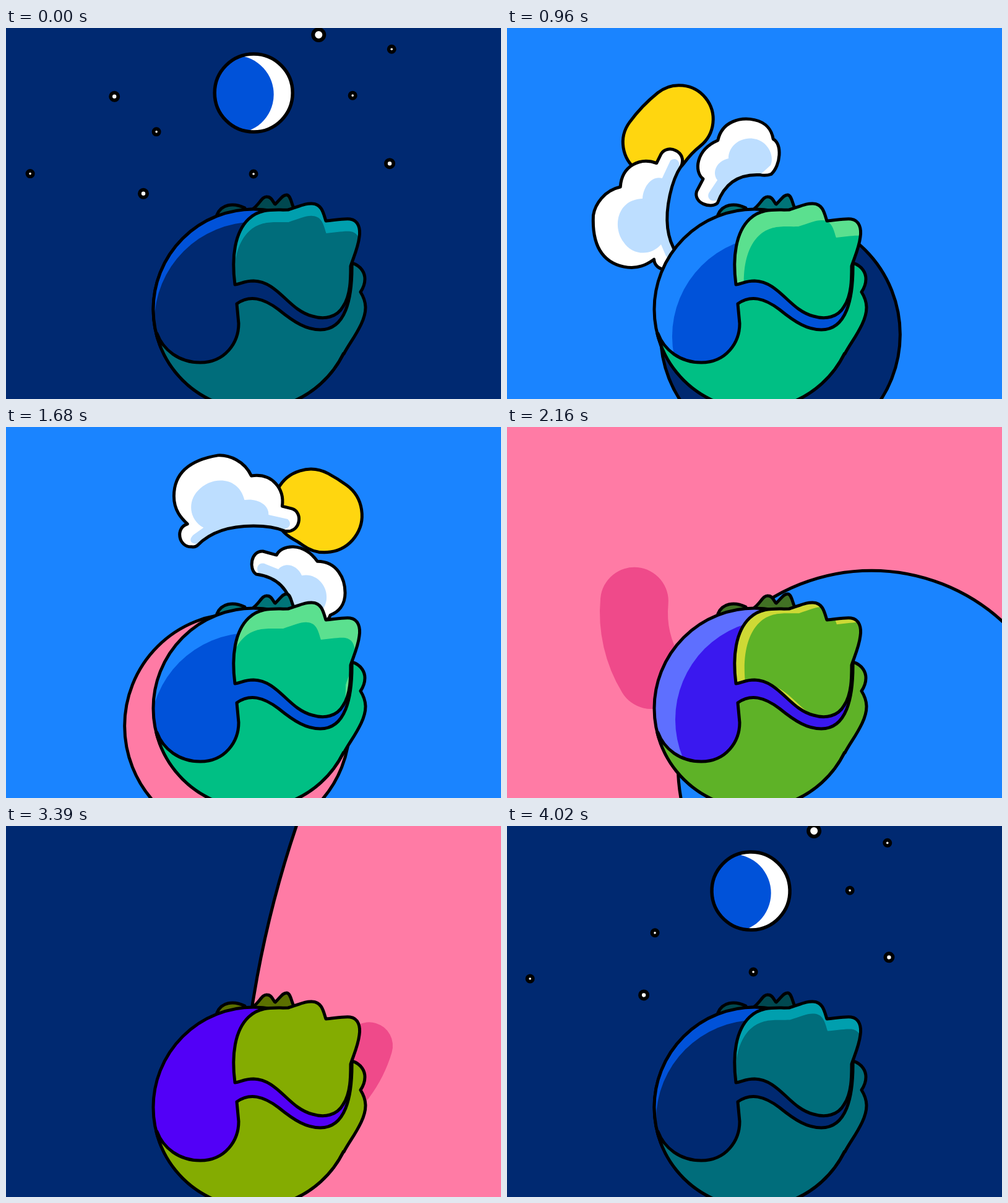
An HTML page with a canvas that plays this animation: 800x600 px, repeating every 4050 ms.

```html
<!DOCTYPE html>
<html lang="en">
<head>
<meta charset="utf-8">
<title>Day and night</title>
<style>
html, body { margin: 0; width: 100%; height: 100%; overflow: hidden; }
canvas { display: block; }
</style>
</head>
<body>
<canvas id="stage" width="800" height="600"></canvas>
<script>
const ctx = document.getElementById('stage').getContext('2d');
const SCENE = 1350, LOOP = 3 * SCENE, FLIP = 668, LINE = 5;
const EARTH = { x: 400, y: 455, r: 162 };
const HUB = { x: 400, y: 300, r: 195 };

const scenes = [
  { sky: '#002971', ocean: '#002971', shine: '#0052d9', land: '#006d7b', lit: '#009fae', back: '#004850', depth: .57 },
  { sky: '#1a84ff', ocean: '#0052d9', shine: '#1a84ff', land: '#00bf84', lit: '#5be08f', back: '#007478', depth: 1 },
  { sky: '#ff7ba5', ocean: '#5200f8', shine: '#7b66ff', land: '#85ac00', lit: '#ffd60f', back: '#5c7000', depth: 1 }
];

// x, y, outer radius, inner radius
const stars = [
  [505, 11, 12, 6], [623, 34, 7.5, 1.8], [243, 168, 7.5, 1.8], [560, 109, 7.5, 1.8],
  [620, 219, 9, 3.2], [39, 236, 7.5, 1.8], [222, 268, 9, 3.2], [400, 236, 7.5, 1.8], [175, 111, 9, 3.2]
];

const clouds = [
  { x: 372, y: 130,
    body: 'M310 191Q340 160 400 160Q430 160 450 168C475 173 481 138 462 132L446 128C450 100 430 74 396 79C385 55 360 45 342 46C300 53 271 72 271 112C271 135 283 148 293 157C273 163 278 195 300 194Q306 195 310 191Z',
    shade: 'M310 189C294 190 296 179 305 173L319 163C295 150 293 120 310 103C330 80 375 78 385 118C405 115 425 125 424 142L455 149C463 157 457 166 445 165Q400 150 340 172Z' },
  { x: 485, y: 260,
    body: 'M404 238C392 230 395 200 415 201L437 207C445 190 480 185 503 217C535 217 548 245 548 268C548 288 537 299 524 304C520 320 485 325 468 313Q463 305 463 296Q455 245 404 238Z',
    shade: 'M408 236C402 226 410 217 420 222L440 230C450 218 470 222 478 240C500 235 520 255 518 278C516 300 495 312 482 309L465 297Q455 245 408 236Z' }
].map(c => ({ ...c, body: new Path2D(c.body), shade: new Path2D(c.shade) }));

const hills = new Path2D('M341 302C348 285 367 282 386 291L386 300M400 292C411 283 414 272 422 273C430 273 432 283 435 285C443 278 447 269 454 270C460 271 461 283 465 291L464 300L400 300');
const upperLand = new Path2D('M370 415C364 370 370 330 392 309C412 290 435 295 456 294C475 288 485 283 495 284C511 285 513 300 517 312C530 311 545 308 556 309C570 311 573 325 571 338C569 355 562 370 557 385C557 405 557 432 545 450C535 468 515 472 495 466C456 456 440 410 400 409C385 409 379 414 370 415Z');
const lowerLand = new Path2D('M244 494C254 521 280 541 314 541C354 541 376 509 376 478L373 446C394 431 416 437 440 455C467 477 486 488 508 488C548 488 560 440 559 380C575 385 580 397 580 406C580 415 577 421 573 427C583 443 584 458 574 479C564 500 555 510 546 527');
lowerLand.arc(EARTH.x, EARTH.y, EARTH.r, .456, 2.9);
lowerLand.closePath();

// phase, land shadow x and y, ocean shadow x and y
const shadowKeys = [
  [0, 1, 35, 3, 36], [180, 2, 35, 2, 52], [330, -8, 32, -5, 40], [560, -12, 8, -10, 10],
  [640, 0, 0, 0, 0], [695, 0, 0, 0, 0], [810, 16, 7, 34, 18], [960, 15, 27, 29, 44], [SCENE, 1, 35, 3, 36]
];

const clamp = (v, lo = 0, hi = 1) => Math.min(hi, Math.max(lo, v));
const lerp = (a, b, m) => a + (b - a) * m;
const rad = deg => deg * Math.PI / 180;

function mix(a, b, m) {
  const part = (c, i) => parseInt(c.slice(i, i + 2), 16);
  return `rgb(${[1, 3, 5].map(i => Math.round(lerp(part(a, i), part(b, i), m)))})`;
}

function shadow(phase) {
  const i = shadowKeys.findIndex(k => k[0] > phase);
  const a = shadowKeys[i - 1], b = shadowKeys[i];
  return a.map((v, n) => lerp(v, b[n], (phase - a[0]) / (b[0] - a[0])));
}

// Degrees from the top of the orbit, x ms away from the middle of a scene
const orbit = x => x < 0 ? .06 * x - 2.45e-8 * (-x) ** 3.46 : .06 * x + 7.76e-6 * x ** 2.46;
const presence = x => clamp((x + 600) / 170) * clamp((680 - x) / 180);

function paint(path, fill, line = LINE) {
  ctx.fillStyle = fill;
  ctx.fill(path);
  if (line) outline(path, line);
}

function outline(path, line = LINE) {
  ctx.lineWidth = line;
  ctx.stroke(path);
}

function disc(x, y, r) {
  const p = new Path2D();
  p.arc(x, y, r, 0, 7);
  return p;
}

function clipped(path, draw) {
  ctx.save();
  ctx.clip(path);
  draw();
  ctx.restore();
}

// Disc smeared along the orbit by its own speed
function body(x, size, turn = 0) {
  const speed = (orbit(x + 1) - orbit(x - 1)) / 2, extra = (speed - .06) ** 2;
  const r = x < 0 ? Math.max(55, size - 225 * extra) : Math.max(15, size - 475 * extra);
  const reach = clamp((speed - .06) * 30) * (22 + 28 * speed);
  const a = rad(orbit(x - reach) - 90 + turn), b = rad(orbit(x + reach) - 90 + turn);
  const at = (ang, from, to) => p.arc(HUB.x + HUB.r * Math.cos(ang), HUB.y + HUB.r * Math.sin(ang), r, from, to);
  const p = new Path2D();
  p.arc(HUB.x, HUB.y, HUB.r + r, a, b);
  at(b, b, b + Math.PI);
  p.arc(HUB.x, HUB.y, HUB.r - r, b, a, true);
  at(a, a + Math.PI, a + 2 * Math.PI);
  p.closePath();
  return p;
}

function spin(deg, draw) {
  ctx.save();
  ctx.translate(HUB.x, HUB.y);
  ctx.rotate(rad(deg));
  ctx.translate(-HUB.x, -HUB.y);
  draw();
  ctx.restore();
}

function night(x) {
  const s = presence(x - 20);
  spin(orbit(x), () => stars.forEach(([sx, sy, outer, inner], i) => {
    if (!s || (i === 8 && x < -20)) return;
    paint(disc(sx, sy, outer * s), '#000', 0);
    paint(disc(sx, sy, inner * s), '#fff', 0);
  }));
  const moon = body(x, 63);
  paint(moon, '#fff', 0);
  clipped(moon, () => paint(body(x, 63, -9), scenes[0].shine, 0));
  outline(moon, 5.5);
}

function day(x) {
  paint(body(x, 64), '#ffd60f');
  const s = presence(x);
  if (!s) return;
  spin(orbit(x) - 32, () => clouds.forEach(c => {
    ctx.save();
    ctx.translate(c.x, c.y);
    ctx.scale(s, s);
    ctx.translate(-c.x, -c.y);
    paint(c.body, '#fff', 0);
    clipped(c.body, () => paint(c.shade, '#bddeff', 0));
    outline(c.body);
    ctx.restore();
  }));
}

function dusk(x) {
  paint(body(x, 72), '#ef4a8a', 0);
}

// The new sky swells out to the left, then the old one shrinks away on the right
function sky(from, to, phase) {
  const d = phase - FLIP, far = Math.abs(d), side = Math.sign(d) || 1;
  const bend = Math.max(.006, Math.tanh(far / 250 + (far / 560) ** 5));
  const r = EARTH.r / bend;
  const edge = Math.min(EARTH.r, -58 * Math.log(bend)) - EARTH.r;
  ctx.fillStyle = d < 0 ? from.sky : to.sky;
  ctx.fillRect(0, 0, 800, 600);
  paint(disc(EARTH.x + side * (edge + r), EARTH.y + 110 * (1 - bend ** 2.6), r), d < 0 ? to.sky : from.sky);
}

function earth(from, to, phase) {
  const m = clamp((phase - 690) / 172);
  const tone = key => mix(from[key], to[key], m);
  const depth = lerp(from.depth, to.depth, m);
  const [, lx, ly, ox, oy] = shadow(phase).map(v => v * depth);
  const globe = disc(EARTH.x, EARTH.y, EARTH.r);

  paint(hills, tone('back'));
  paint(globe, tone('shine'), 0);
  clipped(globe, () => paint(disc(EARTH.x + ox, EARTH.y + oy, EARTH.r), tone('ocean'), 0));
  outline(globe);
  paint(lowerLand, tone('land'));
  paint(upperLand, tone('lit'), 0);
  clipped(upperLand, () => {
    ctx.translate(lx, ly);
    paint(upperLand, tone('land'), 0);
  });
  outline(upperLand);
}

function frame(now) {
  const t = now % LOOP, i = Math.floor(t / SCENE), phase = t % SCENE;
  const from = scenes[i], to = scenes[(i + 1) % 3];
  ctx.strokeStyle = '#000';
  ctx.lineJoin = ctx.lineCap = 'round';
  sky(from, to, phase);
  [night, day, dusk].forEach((draw, n) => {
    const x = (t - n * SCENE + SCENE + LOOP) % LOOP - SCENE;
    if (x > -610 && x < 860) draw(x);
  });
  earth(from, to, phase);
}

const start = performance.now();
function tick() {
  frame(performance.now() - start);
  requestAnimationFrame(tick);
}
tick();
</script>
</body>
</html>
```
